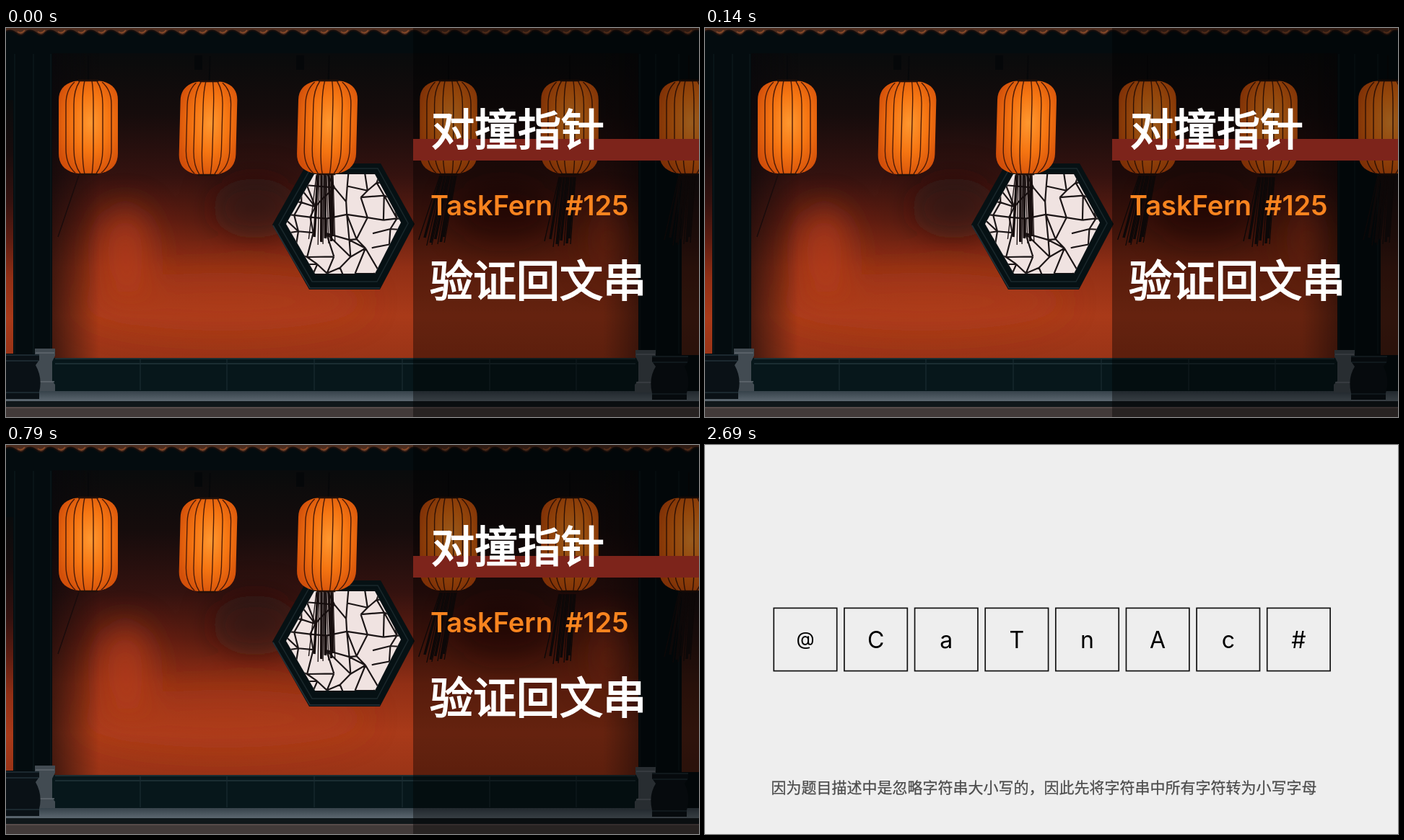
Recreate the animation shown at these times as an HTML page. Size 960x540 px, loop 8 s.

```html
<!DOCTYPE html>
<html lang="zh-CN">
<head>
<meta charset="utf-8">
<title>对撞指针</title>
<style>
  html, body { margin: 0; width: 100%; height: 100%; overflow: hidden; background: #eee; }
  svg { display: block; width: 100vw; height: 100vh; }
  text { font-family: Inter, "Noto Sans CJK SC", "Noto Sans CJK", sans-serif; }
  .cjk { font-family: "Noto Sans CJK SC", "Noto Sans CJK", sans-serif; }
  .title { font-size: 60px; font-weight: 500; fill: #fff; stroke: #fff; stroke-width: 1.9; }
  .sub { font-size: 38px; font-weight: 600; fill: #f8841f; }
  .cell { fill: none; stroke: #111; stroke-width: 1.7; }
  .letter { font-size: 32px; text-anchor: middle; fill: #000; }
  .caption { font-size: 21px; fill: #4b4b4b; stroke: #4b4b4b; stroke-width: .25; animation: caption 8s step-end infinite; }
  .cover { animation: cover 8s step-end infinite; }
  @keyframes cover { 0% { visibility: visible; } 10.5%, 100% { visibility: hidden; } }
  @keyframes caption { 0% { visibility: hidden; } 33.625%, 100% { visibility: visible; } }
</style>
</head>
<body>
<svg viewBox="0 0 960 540">
  <defs>
    <linearGradient id="wall" x2="0" y2="1">
      <stop offset="0" stop-color="#090b0c"/>
      <stop offset=".2" stop-color="#160c0c"/>
      <stop offset=".4" stop-color="#34120f"/>
      <stop offset=".55" stop-color="#5e1d11"/>
      <stop offset=".7" stop-color="#912f15"/>
      <stop offset=".86" stop-color="#a93a19"/>
      <stop offset="1" stop-color="#9a3417"/>
    </linearGradient>
    <linearGradient id="edge">
      <stop offset="0" stop-color="#08070a" stop-opacity=".6"/>
      <stop offset=".08" stop-color="#08070a" stop-opacity="0"/>
      <stop offset=".94" stop-color="#08070a" stop-opacity="0"/>
      <stop offset="1" stop-color="#08070a" stop-opacity=".4"/>
    </linearGradient>
    <radialGradient id="glow" cx=".54" cy=".45" r=".62">
      <stop offset="0" stop-color="#ff9830"/>
      <stop offset=".5" stop-color="#f57512"/>
      <stop offset="1" stop-color="#d24f0a"/>
    </radialGradient>
    <linearGradient id="ledge" x2="0" y2="1">
      <stop offset="0" stop-color="#36424a"/>
      <stop offset="1" stop-color="#5c6770"/>
    </linearGradient>
    <filter id="soft" x="-50%" y="-50%" width="200%" height="200%"><feGaussianBlur stdDeviation="22"/></filter>
    <clipPath id="wallClip"><rect x="64" y="35" width="812" height="424"/></clipPath>
    <clipPath id="pane"><path d="M388 272L427 203H511L547 270L511 341H428Z"/></clipPath>
    <pattern id="tiles" width="28" height="14" patternUnits="userSpaceOnUse">
      <path d="M0 0H28V5Q21 14 14 7Q7 1 0 5Z" fill="#4c2c1e"/>
      <path d="M0 5Q7 1 14 7Q21 14 28 5" fill="none" stroke="#150e0c" stroke-width="2"/>
      <path d="M16 5Q21 9 26 3" fill="none" stroke="#8a4a28" stroke-width="1.5"/>
    </pattern>

    <g id="lantern">
      <path d="M0 -100V-64" stroke="#07080a" stroke-width="2"/>
      <path d="M-20 -64Q0 -67 20 -64C34 -60 41 -52 41 -38V36C41 50 34 59 20 63Q0 67 -20 63C-34 59 -41 50 -41 36V-38C-41 -52 -34 -60 -20 -64Z" fill="url(#glow)"/>
      <path d="M-19 -63Q-31 -52 -31 -32V30Q-31 52 -18 63M-12 -64Q-20 -52 -20 -32V30Q-20 52 -11 64M-5 -65Q-8 -52 -8 -32V30Q-8 52 -5 65M5 -65Q7 -52 7 -32V30Q7 52 5 65M12 -64Q20 -52 20 -32V30Q20 52 11 64M19 -63Q32 -52 32 -32V30Q32 52 18 63"
        fill="none" stroke="#4a1a08" stroke-width="1.4"/>
      <path d="M-14 -65H14M-13 65H13" stroke="#24110a" stroke-width="2.5"/>
    </g>
    <g id="tassel" fill="none" stroke="#160d0d">
      <path d="M-10 0L-24 86M-5 0L-15 93M0 0L-9 88M5 0L-1 92M9 0L2 85" stroke-width="3.5"/>
      <path d="M-12 0L-32 89M-8 0L-20 97M-2 0L-13 96M2 0L-5 95M11 0L4 93" stroke-width="1.3"/>
    </g>
  </defs>

  <rect width="960" height="540" fill="#eee"/>
  <g id="cells"></g>
  <text class="caption cjk" x="91.5" y="482.5">因为题目描述中是忽略字符串大小写的，因此先将字符串中所有字符转为小写字母</text>

  <g class="cover">
    <rect width="960" height="540" fill="#040c0f"/>

    <!-- wall -->
    <rect x="64" y="35" width="812" height="424" fill="url(#wall)"/>
    <g clip-path="url(#wallClip)">
      <g filter="url(#soft)">
        <ellipse cx="165" cy="310" rx="38" ry="62" fill="#bd401c" opacity=".7"/>
        <ellipse cx="345" cy="250" rx="60" ry="42" fill="#210d0d" opacity=".55"/>
        <ellipse cx="690" cy="255" rx="70" ry="42" fill="#210d0d" opacity=".5"/>
        <ellipse cx="835" cy="295" rx="30" ry="50" fill="#a83a18" opacity=".6"/>
        <ellipse cx="300" cy="380" rx="200" ry="40" fill="#b7421c" opacity=".4"/>
      </g>
    </g>
    <rect x="64" y="35" width="812" height="424" fill="url(#edge)"/>
    <rect y="100" width="10" height="352" fill="url(#wall)"/>
    <rect x="936" y="70" width="24" height="384" fill="url(#wall)" opacity=".45"/>
    <path d="M101 204L72 290" stroke="#1a0c0c" stroke-width="1.5"/>

    <!-- eaves and pillars -->
    <rect width="960" height="14" fill="url(#tiles)"/>
    <path d="M12 36V452M38 36V452M62 36V452M878 36V446M900 36V452M932 36V452" stroke="#091417" stroke-width="2"/>
    <path d="M261 38H272V58H261ZM402 38H413V58H402Z" fill="#050709"/>

    <!-- plinth and floor -->
    <rect x="64" y="458" width="812" height="46" fill="#07171b"/>
    <path d="M68 459H872M68 466H872" stroke="#22343a" stroke-width="1.3"/>
    <path d="M186 460V503M306 460V503M427 460V503M549 460V503M670 460V503M790 460V503" stroke="#1b2c32" stroke-width="1.2"/>
    <rect y="504" width="960" height="14" fill="url(#ledge)"/>
    <rect y="518" width="960" height="8" fill="#10171a"/>
    <rect y="526" width="960" height="14" fill="#423a39"/>
    <path d="M0 527H960" stroke="#6a5d5a"/>
    <path d="M40 445H68V455L64 463V490L68 495V504H40ZM900 447H872V456L876 464V490L871 495V506H900Z" fill="#424b52"/>
    <path d="M41 451H67M42 491H67M873 453H899M873 492H899" stroke="#616a70" stroke-width="1.5"/>
    <path d="M0 453H46V461L41 468Q51 486 46 505V515H0ZM895 455H945V463L940 470Q949 488 943 507V516H895V507Q890 486 900 470L895 463Z" fill="#0a1116"/>
    <path d="M0 454H46M0 462H45M0 506H46M895 456H945M896 464H944M895 508H943" stroke="#223038" stroke-width="1.5"/>

    <!-- window -->
    <path d="M369 273L417 188H519L566 272L518 363H420Z" fill="#061114"/>
    <path d="M378 273L422 195H515L557 271L514 352H424Z" fill="none" stroke="#1a282c" stroke-width="1.5"/>
    <path d="M420 361H518M370 274L421 361" stroke="#243138" stroke-width="1.5"/>
    <g clip-path="url(#pane)">
      <path d="M380 200H550V345H380Z" fill="#f0e3e1"/>
      <path id="lattice" fill="none" stroke="#1c1617" stroke-width="2.2"/>
    </g>

    <use href="#tassel" transform="translate(613 205) skewX(-6)"/>
    <use href="#tassel" x="778" y="207"/>
    <use href="#tassel" x="944" y="205"/>
    <use href="#tassel" transform="translate(442 204) skewX(6)"/>
    <use href="#lantern" x="114" y="138"/>
    <use href="#lantern" transform="translate(280 139) skewX(-1.5) scale(.96 1)"/>
    <use href="#lantern" transform="translate(445 138) skewX(-1.5)"/>
    <use href="#lantern" transform="translate(613 138) scale(.97 1)"/>
    <use href="#lantern" transform="translate(781 138) scale(.97 1)"/>
    <use href="#lantern" x="946" y="138"/>

    <!-- title panel -->
    <rect x="564" width="396" height="540" fill="#000" opacity=".4"/>
    <rect x="564" y="154" width="396" height="30" fill="#7d241b"/>
    <text class="title cjk" x="589" y="163">对撞指针</text>
    <text class="sub" x="588" y="260">TaskFern<tspan x="775">#125</tspan></text>
    <text class="title cjk" x="587" y="373">验证回文串</text>
  </g>
</svg>
<script>
  const cells = document.getElementById("cells");

  function add(tag, attrs, label = "") {
    const node = document.createElementNS("http://www.w3.org/2000/svg", tag);
    for (const key in attrs) node.setAttribute(key, attrs[key]);
    node.textContent = label;
    cells.append(node);
    return node;
  }

  [..."@CaTnAc#"].forEach((char, i) => {
    const x = 95.3 + 97.63 * i;
    add("rect", { class: "cell", x, y: 226.4, width: 87.4, height: 87.2 });
    const letter = add("text", { class: "letter", x: x + 43.7, y: 281.5 }, char);
    if (char === "@") {
      letter.style.fontSize = "26px";
      letter.setAttribute("y", 278);
    }
  });

  // Cracked-ice lattice: a jittered grid with some diagonals
  let seed = 7;
  const random = () => (seed = (seed * 16807) % 2147483647) / 2147483647;
  const jitter = () => (random() - 0.5) * 19;
  const grid = Array.from({ length: 8 }, (_, row) =>
    Array.from({ length: 9 }, (_, col) => [378 + col * 23 + jitter(), 195 + row * 23 + jitter()]));
  let path = "";
  const join = (a, b) => { path += `M${a}L${b}`; };
  for (let row = 0; row < 7; row++) {
    for (let col = 0; col < 8; col++) {
      const from = grid[row][col];
      if (random() < 0.85) join(from, grid[row][col + 1]);
      if (random() < 0.85) join(from, grid[row + 1][col]);
      if (random() < 0.25) join(from, grid[row + 1][col + 1]);
    }
  }
  document.getElementById("lattice").setAttribute("d", path);
</script>
</body>
</html>
```
